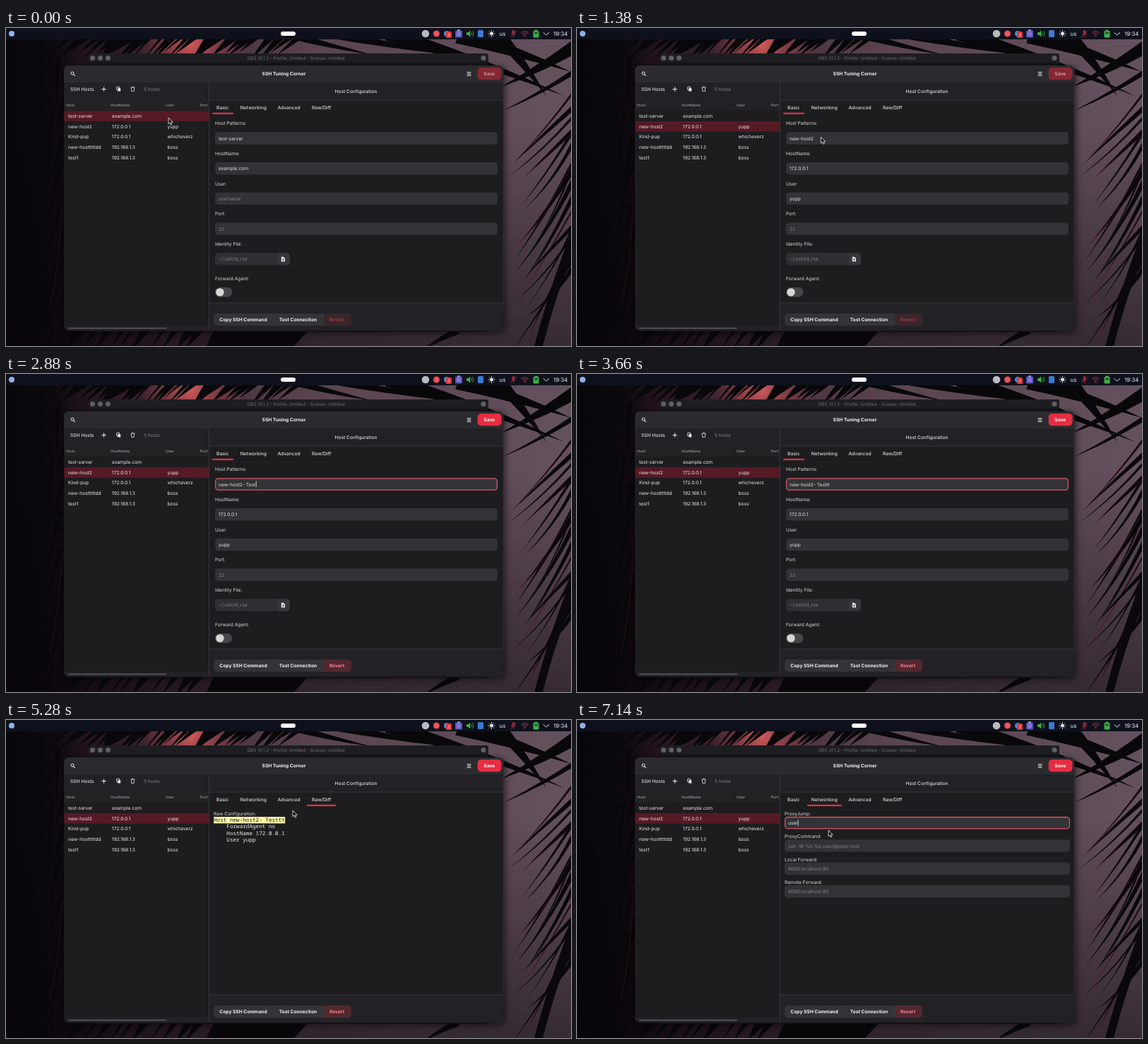
Write an HTML page that moves like this. It is 800x450 px and loops after 7200 ms.

```html
<!DOCTYPE html>
<html lang="en">
<head>
<meta charset="utf-8">
<title>SSH Tuning Corner</title>
<style>
  html, body { margin: 0; width: 100%; height: 100%; overflow: hidden; background: #09080b; }
  svg { display: block; width: 800px; height: 450px; }
  text { font-family: Inter, sans-serif; font-size: 6.67px; fill: #dededf; text-rendering: geometricPrecision; white-space: pre; }
  .mono { font-family: "Noto Sans Mono", "DejaVu Sans Mono", monospace; font-size: 7.65px; }
</style>
</head>
<body>
<svg id="stage" viewBox="0 0 800 450" xmlns="http://www.w3.org/2000/svg"></svg>
<script>
const LOOP = 7200, STEP = 60;
const ACCENT = '#e62d42';

// ---------- drawing helpers ----------
const rect = (x, y, w, h, fill, r = 0, extra = '') =>
  `<rect x="${x}" y="${y}" width="${w}" height="${h}" rx="${r}" fill="${fill}" ${extra}/>`;
const dot = (x, y, r, fill, extra = '') => `<circle cx="${x}" cy="${y}" r="${r}" fill="${fill}" ${extra}/>`;
const line = (d, color, w = 1) =>
  `<path d="${d}" fill="none" stroke="${color}" stroke-width="${w}" stroke-linecap="round" stroke-linejoin="round"/>`;
const shape = (d, fill, extra = '') => `<path d="${d}" fill="${fill}" ${extra}/>`;
const group = (id, body) => `<g id="${id}">${body}</g>`;

// y is the vertical middle of the text
function label(x, y, str, { fill = '#dededf', size = 6.67, weight = 400, mid = false, id = '', cls = '' } = {}) {
  const style = cls ? `fill:${fill}` : `fill:${fill};font-size:${size}px;font-weight:${weight}`;
  return `<text x="${x}" y="${(y + size * 0.36).toFixed(2)}" ${id && `id="${id}"`} ${cls && `class="${cls}"`}
    ${mid ? 'text-anchor="middle"' : ''} style="${style}">${str}</text>`;
}

let seed = 11;
const rnd = (a, b) => {
  seed = (seed * 16807) % 2147483647;
  return a + (b - a) * seed / 2147483647;
};

// strand that narrows from a wide base to a sharp tip
function blade(x, y, tx, ty, w, bend, fill = '#08070a', extra = '') {
  const len = Math.hypot(tx - x, ty - y);
  const nx = -(ty - y) / len, ny = (tx - x) / len;
  const cx = (x + tx) / 2 + nx * bend, cy = (y + ty) / 2 + ny * bend;
  const p = (a, b) => `${a.toFixed(1)},${b.toFixed(1)}`;
  return shape(`M${p(x + nx * w, y + ny * w)} Q${p(cx + nx * w * .6, cy + ny * w * .6)} ${p(tx, ty)}
    Q${p(cx - nx * w * .6, cy - ny * w * .6)} ${p(x - nx * w, y - ny * w)}Z`, fill, extra);
}

// ---------- wallpaper ----------
function wallpaper() {
  let s = `<defs>
    <linearGradient id="sky">
      <stop offset="0" stop-color="#07060a"/><stop offset=".08" stop-color="#0c090e"/>
      <stop offset=".15" stop-color="#24141f"/><stop offset=".32" stop-color="#452c3a"/>
      <stop offset=".55" stop-color="#59444f"/><stop offset="1" stop-color="#64515e"/>
    </linearGradient>
    <linearGradient id="dusk" x2="0" y2="1">
      <stop offset=".3" stop-color="#000" stop-opacity="0"/><stop offset="1" stop-color="#08050a" stop-opacity=".5"/>
    </linearGradient>
    <radialGradient id="glow" cx="262" cy="22" r="75" gradientUnits="userSpaceOnUse">
      <stop offset="0" stop-color="#d05a58"/><stop offset="1" stop-color="#8c3540" stop-opacity="0"/>
    </radialGradient>
    <filter id="soft" x="-10%" y="-10%" width="120%" height="120%"><feGaussianBlur stdDeviation="5"/></filter>
  </defs>`;
  s += rect(0, 0, 800, 450, 'url(#sky)') + rect(150, 0, 220, 60, 'url(#glow)') + rect(0, 0, 800, 450, 'url(#dusk)');
  // upper strip
  for (let i = 0; i < 30; i++) {
    const x = 75 + i * 11 + rnd(-5, 5);
    s += blade(x + 24, 10, x - rnd(4, 14), rnd(34, 50), rnd(2, 5.5) * (i < 9 ? 1.5 : 1), rnd(-2, 2));
  }
  s += blade(410, 12, 520, 38, 5, 2) + blade(470, 10, 650, 40, 6, 3);
  // sweeping mass at the upper right
  s += blade(540, 8, 790, 96, 10, -9) + blade(640, 10, 800, 62, 12, -4) + blade(700, 12, 765, 96, 9, -3);
  s += blade(815, 20, 700, 84, 10, -5) + blade(815, 55, 702, 118, 4, -5);
  // strands at the right
  for (let i = 0; i < 19; i++) {
    const y = 85 + i * 13 + rnd(-8, 8);
    s += blade(812, y, rnd(698, 745), y + rnd(75, 155), rnd(1.2, 4.2), rnd(-14, 4),
      '#09070b', i % 4 ? '' : 'stroke="#6b2633" stroke-width=".5"');
  }
  s += shape('M800,290 Q772,360 748,450 L760,450 Q780,372 800,330Z', '#0a080c');
  // left edge and lower strip
  for (let i = 0; i < 9; i++) s += blade(rnd(66, 92), 40 + i * 38, rnd(52, 74), 120 + i * 42, rnd(2, 5), 4, '#08070a');
  s += line('M80,235 Q77,330 62,395', '#3a1721', .7);
  for (let i = 0; i < 17; i++) {
    const x = 95 + i * 19 + rnd(-6, 6);
    s += blade(x + 14, 425, x - 8, 456, rnd(2, 7), 1);
  }
  s += shape('M300,428 H428 L408,450 H284Z', '#09070a') + blade(640, 428, 590, 455, 5, 2);
  return s;
}

// ---------- top panel ----------
function panel() {
  return rect(0, 0, 800, 16, '#0e111b') + dot(8, 8, 4, '#8fb1ea') + rect(389, 5, 21, 6, '#fff', 3)
    + dot(594, 8, 5.3, '#b9bac0')
    + dot(609.5, 8, 5, '#7c2a35') + dot(609.5, 8, 3.9, '#f0545f')
    + dot(624, 8, 4, '#3d8fd0') + rect(623, 5, 8, 9, '#e03a42', 1.5) + label(627, 9.5, '1', { size: 6, mid: true, fill: '#fff' })
    + rect(636, 3.5, 10, 10, '#4d57b8', 1.5) + rect(638, 5.5, 6, 6, '#8f6fd0', 1) + rect(639, 2, 4, 3, '#7d8be0', 1)
    + shape('M652,6.3h2.3l3-2.8v9l-3-2.8h-2.3Z', '#47b04c') + line('M659,6q1.6,2 0,4M660.6,4.4q2.8,3.6 0,7.2', '#47b04c', .8)
    + rect(668, 3, 8, 10, '#3a7bd0', 1.5)
    + dot(687.5, 8, 2.4, '#f0f0f0')
    + [0, 1, 2, 3, 4, 5, 6, 7].map(i => {
        const c = Math.cos(i * Math.PI / 4), n = Math.sin(i * Math.PI / 4);
        return line(`M${687.5 + c * 3.6},${8 + n * 3.6}L${687.5 + c * 4.6},${8 + n * 4.6}`, '#f0f0f0', .9);
      }).join('')
    + label(703, 8, 'us', { size: 8, mid: true, fill: '#f0f0f0' })
    + rect(716.5, 3, 4, 6.5, '#9a2a3c', 2) + line('M714.8,8q3.7,5 7.4,0M718.5,11v2M714.5,12.5L723,4', '#9a2a3c', .9)
    + line('M729.8,6.5q4.7,-4 9.4,0M731.4,8.6q3.1,-2.4 6.2,0', '#a02c3c', 1.2) + dot(734.5, 11, 1.3, '#a02c3c')
    + rect(746.5, 4, 8, 9.5, '#3fae4a', 1.2) + rect(748.5, 2.6, 4, 2, '#3fae4a') + rect(748, 5.5, 5, 3, '#23602c')
    + line('M761,6.5l3.8,3.6l3.8,-3.6', '#e4e4e6', 1)
    + label(775, 8.2, '19:34', { size: 7.9, fill: '#f2f2f3' });
}

// ---------- windows ----------
function backWindow() {
  return rect(117, 36, 566, 394, '#17171b', 4) + rect(117, 36, 566, 13, '#1d1d22', 4)
    + [122.5, 133.5, 144.5, 676].map(x => dot(x, 42.5, 3.5, '#606065')).join('')
    + label(410.5, 42.7, 'OBS 31.1.2 - Profile: Untitled - Scenes: Untitled', { mid: true, fill: '#707075', size: 6.3 });
}

const HOSTS = [
  ['test-server', 'example.com', ''],
  ['new-host2', '172.0.0.1', 'yupp'],
  ['Kind-pup', '172.0.0.1', 'whicheverz'],
  ['new-hostttttdd', '192.168.1.3', 'boss'],
  ['test1', '192.168.1.3', 'boss'],
];
const rowY = i => 124.8 + i * 14.6;

const TABS = [
  { name: 'Basic', x: 292, w: 30, c: 306.7 },
  { name: 'Networking', x: 326, w: 49, c: 350.3 },
  { name: 'Advanced', x: 379, w: 43, c: 400.6 },
  { name: 'Raw/Diff', x: 426, w: 41, c: 446.6 },
];

function frameWindow() {
  const head = (x, s) => label(x, 109, s, { size: 5.35, weight: 600, fill: '#8b8b8f' });
  return rect(80, 54, 627, 378, '#000', 8, 'opacity=".55" filter="url(#soft)"')
    + rect(82, 53, 622.5, 375.5, '#222226', 7)
    + shape('M82,77V60a7,7 0 0 1 7,-7H697.5a7,7 0 0 1 7,7V77Z', '#2b2b2f')
    + rect(82, 102, 205.5, 319, '#1d1d20') + rect(82, 102, 205.5, 14.8, '#222225')
    + rect(288, 102, 416, 287, '#1d1d20')
    + line('M287.5,77V428M288,102H704M288,389H704', '#3b3b3f', .8)
    + line('M704.2,77V389', '#3b3b3f', .6)
    + dot(94, 64, 2, 'none', 'stroke="#e6e6e8" stroke-width="1"') + line('M95.7,65.8l1.8,1.8', '#e6e6e8', 1.1)
    + label(393.5, 64.8, 'SSH Tuning Corner', { weight: 700, mid: true, fill: '#f4f4f5' })
    + line('M653.2,62.8h4.8M653.2,65h4.8M653.2,67.2h4.8', '#f0f0f1', 1.1)
    + label(91, 86.5, 'SSH Hosts', { weight: 500 })
    + line('M135.8,86.5h5.6M138.6,83.7v5.6', '#ececee', 1)
    + rect(156.7, 83.2, 3.8, 4.6, 'none', .5, 'stroke="#e6e6e8" stroke-width=".9"') + rect(158.4, 85, 3.8, 4.6, '#e6e6e8', .5)
    + line('M176.8,84.2h5.4M178.5,83.2h2M177.4,85l.3,4.4h3.6l.3,-4.4', '#d0d0d2', .9)
    + label(195, 86.5, '5 hosts', { fill: '#86868a' })
    + label(495.5, 89.8, 'Host Configuration', { mid: true, weight: 500 })
    + head(85, 'Host') + head(148, 'HostName') + head(226, 'User') + head(274.5, 'Port')
    + rect(82.5, 117.4, 204.6, 14.6, '#561a24', 0, 'id="pick"')
    + HOSTS.map((h, i) => h.map((s, k) => label([88, 150, 228.5][k], rowY(i), s, { fill: '#ececee' })).join('')).join('')
    + rect(88, 424, 139, 1.5, '#5c5c60', .7)
    + TABS.map((t, i) => group('hover' + i, rect(t.x, 102.5, t.w, 19, '#333337') + rect(t.x, 120.3, t.w, 1.7, '#66666a'))
        + label(t.c, 112.2, t.name, { mid: true, weight: 500 })).join('')
    + rect(292, 119.8, 30, 2.2, ACCENT, .6, 'id="under"')
    + rect(294, 404, 195, 17.2, '#343438', 5)
    + label(336, 412.8, 'Copy SSH Command', { weight: 700, mid: true, fill: '#f4f4f5' })
    + label(413.5, 412.8, 'Test Connection', { weight: 700, mid: true, fill: '#f4f4f5' })
    + shape('M450,404h34a5,5 0 0 1 5,5v7.2a5,5 0 0 1 -5,5h-34Z', '#39262b', 'id="revertBox"')
    + label(468.5, 412.8, 'Revert', { weight: 700, mid: true, id: 'revertText' })
    + rect(667.7, 56, 33.8, 17.3, ACCENT, 5, 'id="saveBox"')
    + label(684.3, 64.9, 'Save', { weight: 700, mid: true, id: 'saveText' });
}

// ---------- pages ----------
const HINT = '#85858a', INK = '#e6e6e8';
const field = (x, y, w, tx, str, fill, id) => rect(x, y - 8.7, w, 17.4, '#333337', 4.5) + label(tx, y + .2, str, { fill, id });
const focusRing = (id, x, y, w) => rect(x + .6, y - 8.1, w - 1.2, 16.2, 'none', 4, `id="${id}" stroke="#cf5564" stroke-width="1.3"`);

function basicPage() {
  const names = ['Host Patterns:', 'HostName:', 'User:', 'Port:', 'Identity File:'];
  return names.map((s, i) => label(296, 134.7 + i * 42.7, s)).join('')
    + ['pattern', 'hostname', 'user'].map((id, i) => field(296, 156 + i * 42.7, 400, 301, '', INK, id)).join('')
    + field(296, 284, 400, 301, '22', HINT)
    + rect(296, 318.2, 106, 17.4, '#2f2f33', 4.5) + shape('M385,318.2h12.5a4.5,4.5 0 0 1 4.5,4.5v8.4a4.5,4.5 0 0 1 -4.5,4.5H385Z', '#37373b')
    + label(301, 327, '~/.ssh/id_rsa', { fill: HINT })
    + shape('M389.8,323.8h3l2.2,2.2v4.6h-5.2Z', '#e6e6e8') + line('M392.4,329.4v-2.7M391.2,327.8l1.2,-1.2l1.2,1.2', '#333337', .7)
    + label(296, 354.3, 'Forward Agent:')
    + rect(296, 367, 24.3, 13.8, '#47474b', 6.9) + dot(302.9, 373.9, 5.7, '#d9d7d5')
    + focusRing('patternRing', 296, 156, 400);
}

function networkPage() {
  const rows = [
    ['ProxyJump:', 'user@jump-host', 'jump'],
    ['ProxyCommand:', 'ssh -W %h:%p user@jump-host', ''],
    ['Local Forward:', '8080:localhost:80', ''],
    ['Remote Forward:', '8080:localhost:80', ''],
  ];
  return rows.map(([name, hint, id], i) => label(294, 132.5 + i * 32.3, name)
      + field(294, 145.6 + i * 32.3, 404, 299, hint, HINT, id)).join('')
    + focusRing('jumpRing', 294, 145.6, 404);
}

function rawPage() {
  const rows = ['Host new-host2- Testtt', '    ForwardAgent no', '    HostName 172.0.0.1', '    User yupp'];
  return label(294, 132.5, 'Raw Configuration:') + rect(294, 137, 101.2, 9.3, '#fbf6a8')
    + rows.map((s, i) => label(294 + 4.59 * (s.length - s.trimStart().length), 141.4 + i * 9.4, s.trim(),
        { cls: 'mono', size: 7.2, fill: i ? '#ececee' : '#27272a' })).join('');
}

const stage = document.getElementById('stage');
stage.innerHTML = wallpaper() + panel() + backWindow() + frameWindow()
  + group('page0', basicPage()) + group('page1', networkPage()) + group('page3', rawPage())
  + rect(0, 0, .8, 8.6, '#f4f4f5', 0, 'id="caret"')
  + group('mouse', shape('M0,0V8.6L2,6.9L3.4,10L4.9,9.3L3.5,6.3H6.2Z', '#0b0b0c', 'stroke="#f4f4f4" stroke-width=".8" stroke-linejoin="round"'));

const $ = id => document.getElementById(id);
const show = (id, on) => { $(id).style.display = on ? '' : 'none'; };

// ---------- timeline ----------
const PATH = [
  [0, 230, 127], [180, 230, 127], [300, 230, 138], [420, 230, 138], [780, 358, 110], [900, 358, 110],
  [1440, 345, 156], [3840, 345, 156], [4380, 446, 112], [4860, 446, 112], [5280, 406, 128],
  [5580, 352, 112], [5700, 352, 112], [5880, 356, 156], [7200, 356, 156],
];
const PICK = 360, FOCUS = 1500, HIDE = 1800, RETURN = 3840, RAW = 4440, NET = 5640, JUMP = 5940;
const TAIL = { text: '- Testtt', at: [2220, 2400, 2580, 2700, 2820, 2880, 2940, 3060] };
const USER = { text: 'user', at: [6480, 6660, 6840, 7020] };

function mouseAt(t) {
  const i = Math.max(1, PATH.findIndex(p => p[0] > t));
  const [t0, x0, y0] = PATH[i - 1], [t1, x1, y1] = PATH[i];
  const k = (t - t0) / (t1 - t0), e = k * k * (3 - 2 * k);
  return [x0 + (x1 - x0) * e, y0 + (y1 - y0) * e];
}

function typed({ text, at }, t) {
  const hits = at.filter(a => a <= t);
  return { str: text.slice(0, hits.length), last: hits.length ? hits[hits.length - 1] : 0 };
}

function render(t) {
  const host = HOSTS[t < PICK ? 0 : 1];
  const tab = t < RAW ? 0 : t < NET ? 3 : 1;
  const tail = typed(TAIL, t), user = typed(USER, t);
  const dirty = tail.str !== '';

  $('pick').setAttribute('y', rowY(t < PICK ? 0 : 1) - 7.4);
  $('pattern').textContent = host[0] + tail.str;
  $('hostname').textContent = host[1];
  $('user').textContent = host[2] || 'username';
  $('user').style.fill = host[2] ? INK : HINT;
  $('jump').textContent = user.str || 'user@jump-host';
  $('jump').style.fill = user.str ? INK : HINT;

  [0, 1, 3].forEach(i => show('page' + i, i === tab));
  $('under').setAttribute('x', TABS[tab].x);
  $('under').setAttribute('width', TABS[tab].w);
  show('patternRing', t >= FOCUS);
  show('jumpRing', t >= JUMP);

  $('saveBox').setAttribute('fill', dirty ? ACCENT : '#862834');
  $('saveText').style.fill = dirty ? '#fff' : '#c39ba0';
  $('revertBox').setAttribute('fill', dirty ? '#51282f' : '#39262b');
  $('revertText').style.fill = dirty ? '#ff7f8a' : '#a03a45';

  const [mx, my] = mouseAt(t), seen = t < HIDE || t >= RETURN;
  show('mouse', seen);
  $('mouse').setAttribute('transform', `translate(${mx.toFixed(2)},${my.toFixed(2)})`);
  TABS.forEach((b, i) => show('hover' + i, seen && i !== tab && my > 102 && my < 122 && mx >= b.x && mx <= b.x + b.w));

  const inPattern = tab === 0 && t >= FOCUS, inJump = tab === 1 && t >= JUMP;
  const since = t - (inPattern ? Math.max(FOCUS, tail.last) : Math.max(JUMP, user.last));
  show('caret', (inPattern || inJump) && since % 1200 < 600);
  if (inPattern) {
    $('caret').setAttribute('x', 301.6 + $('pattern').getComputedTextLength());
    $('caret').setAttribute('y', 151.7);
  } else if (inJump) {
    $('caret').setAttribute('x', 298.8 + (user.str ? $('jump').getComputedTextLength() : 0));
    $('caret').setAttribute('y', 141.3);
  }
}

const start = performance.now();
function tick() {
  const t = (performance.now() - start) % LOOP;
  render(Math.floor(t / STEP) * STEP);
  requestAnimationFrame(tick);
}
tick();
</script>
</body>
</html>
```
